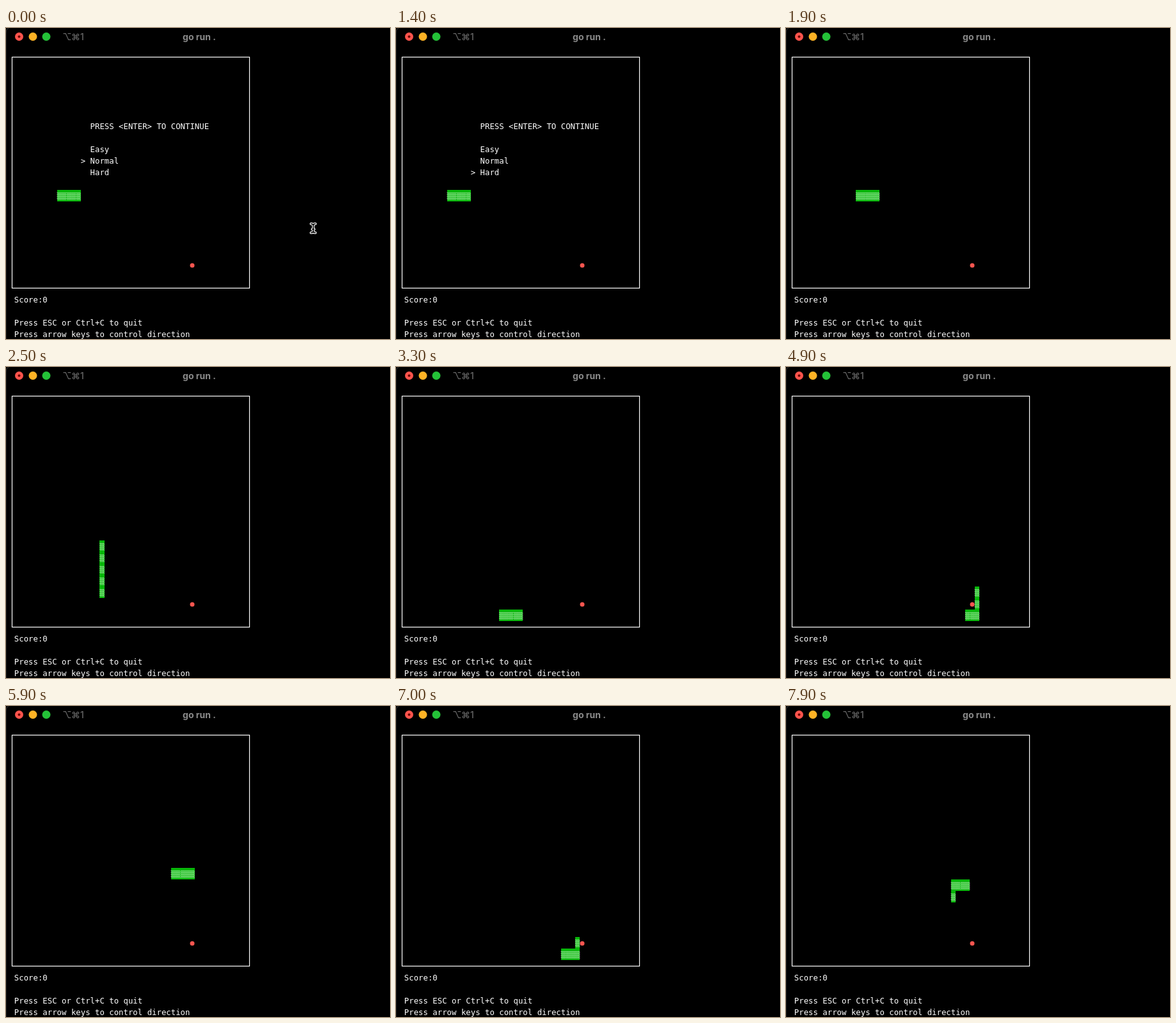
These frames come from a looping animation (600x486 px, 8000 ms). An HTML page with a canvas:

```html
<!DOCTYPE html>
<html lang="en">
<head>
<meta charset="utf-8">
<title>Terminal snake</title>
<style>
  html, body { margin: 0; width: 100%; height: 100%; overflow: hidden; background: #000; }
  canvas { display: block; }
</style>
</head>
<body>
<canvas id="stage" width="600" height="486"></canvas>
<script>
const ctx = document.getElementById('stage').getContext('2d');
const LOOP = 8000, STEP = 100;
const SELECT_AT = 100, START_AT = 1500;
const LENGTH = 5;

// Terminal grid: top left corner and cell size
const X0 = 5.4, Y0 = 36.5, CW = 7.42, CH = 18.05;
const colX = c => X0 + c * CW;
const rowY = r => Y0 + r * CH;

// Every cell the snake visits, from its first tail cell on
const DIRS = { R: [1, 0], L: [-1, 0], U: [0, -1], D: [0, 1] };
const trail = [[10, 12]];
for (const leg of 'R9 D7 R20 U7 L5 D7 R3 U6 L3 D1'.split(' ')) {
  const [dx, dy] = DIRS[leg[0]];
  for (let i = 0; i < +leg.slice(1); i++) {
    const [x, y] = trail[trail.length - 1];
    trail.push([x + dx, y + dy]);
  }
}

function disc(x, y, r, color) {
  ctx.fillStyle = color;
  ctx.beginPath();
  ctx.arc(x, y, r, 0, 7);
  ctx.fill();
}

function print(text, col, row) {
  ctx.font = '12.33px "DejaVu Sans Mono", monospace';
  ctx.textAlign = 'left';
  ctx.fillStyle = '#fff';
  ctx.fillText(text, colX(col), rowY(row) + 13);
}

function titleBar() {
  disc(20.5, 13.5, 6.5, '#ff544d');
  disc(20.5, 13.5, 2, '#6b0500');
  disc(42, 13.5, 6.5, '#fdb225');
  disc(63, 13.5, 6.5, '#24c138');

  ctx.textAlign = 'center';
  ctx.fillStyle = '#666';
  ctx.font = '500 14px Inter, "DejaVu Sans", sans-serif';
  ctx.fillText('⌥', 95.5, 18.5);
  ctx.fillText('⌘', 109, 18.5);
  ctx.fillText('1', 119, 18.5);
  ctx.fillStyle = '#8a8a8a';
  ctx.font = '700 14px Inter, sans-serif';
  ctx.fillText('go run .', 302, 18.5);

  // Window edge
  ctx.strokeStyle = '#333';
  ctx.lineWidth = 1;
  ctx.beginPath();
  ctx.moveTo(0, 486);
  ctx.lineTo(0, 9);
  ctx.quadraticCurveTo(0, 2, 4, 0);
  ctx.stroke();
}

function menu(choice) {
  print('PRESS <ENTER> TO CONTINUE', 17, 6);
  ['Easy', 'Normal', 'Hard'].forEach((name, i) => print(name, 17, 8 + i));
  print('>', 15, 8 + choice);
}

function snakeCell([col, row]) {
  const x = Math.round(colX(col)), y = Math.round(rowY(row) - 0.3);
  ctx.fillStyle = '#08b60a';
  ctx.fillRect(x, y, Math.round(colX(col + 1)) - x, Math.round(rowY(row + 1) - 0.3) - y);
  // Shade glyph
  ctx.fillStyle = 'rgba(235,255,235,.85)';
  for (let j = 0; j < 8; j++) {
    for (let i = 0; i < 4; i++) {
      ctx.fillRect(colX(col) + i * 1.85 + (j % 2) * 0.93, y + 4 + j * 1.5, 1, 1.1);
    }
  }
}

function pointer(x, y) {
  ctx.lineCap = 'round';
  for (const [width, color] of [[4, '#fff'], [1.6, '#000']]) {
    ctx.strokeStyle = color;
    ctx.lineWidth = width;
    ctx.beginPath();
    for (const s of [-1, 1]) {
      ctx.moveTo(x - 3.5, y + s * 7);
      ctx.quadraticCurveTo(x, y + s * 7, x, y + s * 4.5);
      ctx.quadraticCurveTo(x, y + s * 7, x + 3.5, y + s * 7);
    }
    ctx.moveTo(x, y - 5);
    ctx.lineTo(x, y + 5);
    ctx.moveTo(x - 1.5, y + 1.5);
    ctx.lineTo(x + 1.5, y + 1.5);
    ctx.stroke();
  }
  ctx.lineCap = 'butt';
}

function draw(t) {
  ctx.fillStyle = '#000';
  ctx.fillRect(0, 0, 600, 486);
  titleBar();

  ctx.strokeStyle = '#fff';
  ctx.lineWidth = 1.2;
  ctx.strokeRect(9.5, 45.5, 371, 361);

  print('Score:0', 1, 21);
  print('Press ESC or Ctrl+C to quit', 1, 23);
  print('Press arrow keys to control direction', 1, 24);

  if (t < START_AT) menu(t < SELECT_AT ? 1 : 2);
  disc(291, 371, 3.5, '#fb5650');

  const moved = Math.max(0, Math.floor((t - START_AT) / STEP));
  trail.slice(moved, moved + LENGTH).forEach(snakeCell);

  if (t < SELECT_AT) pointer(480, 313);
}

function tick() {
  draw(performance.now() % LOOP);
  requestAnimationFrame(tick);
}
tick();
</script>
</body>
</html>
```
